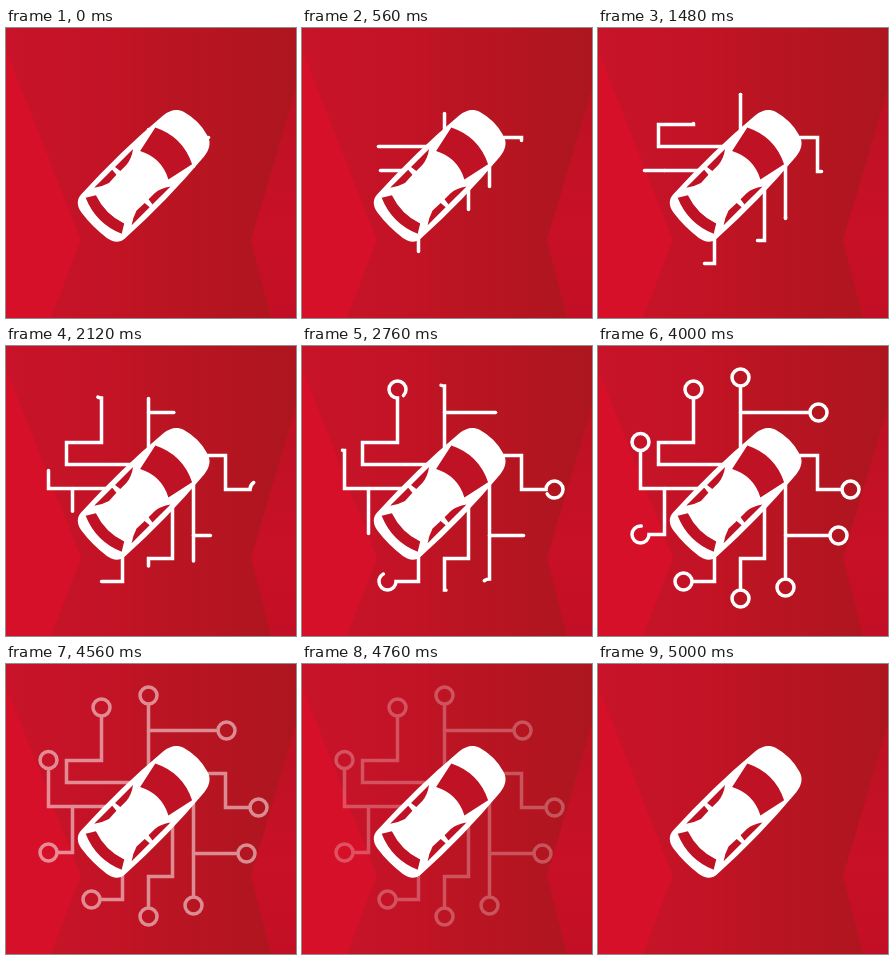
An HTML page for the animation above (5.12 s loop, 290 px wide and 290 px high).

```html
<!DOCTYPE html>
<html lang="en">
<head>
<meta charset="utf-8">
<title>Connected car</title>
<style>
  html, body { margin: 0; width: 100%; height: 100%; overflow: hidden; background: #c01224; }
  svg { display: block; width: 100vw; height: 100vh; }
  #wires { fill: none; stroke: #fff; stroke-width: 3.5; stroke-linecap: round; }
</style>
</head>
<body>
<svg viewBox="0 0 290 290">
  <defs>
    <linearGradient id="back">
      <stop offset="0" stop-color="#c81329"/>
      <stop offset=".4" stop-color="#c21325"/>
      <stop offset=".5" stop-color="#bc1423"/>
      <stop offset="1" stop-color="#ad161e"/>
    </linearGradient>
    <linearGradient id="right" x1="0" y1="0" x2="0" y2="1">
      <stop offset="0" stop-color="#bd1223"/>
      <stop offset=".6" stop-color="#c81026"/>
      <stop offset="1" stop-color="#c30f25"/>
    </linearGradient>
  </defs>
  <path fill="url(#back)" d="M0 0H290V290H0z"/>
  <path fill="#d61029" d="M0 22L75 212L45 290H0z"/>
  <path fill="url(#right)" d="M290 60L245 212L265 290H290z"/>
  <g id="wires" transform="translate(.5 .5)"></g>
  <g transform="translate(138 147.5) rotate(-45)" fill="#bf1224">
    <path fill="#fff" d="M-58 -31Q0 -34 56 -29C65 -28 71 -24 73 -17Q78 0 73 17C71 24 65 28 56 29Q0 34 -58 31C-65 30.500 -69 26 -70.500 18Q-73 0 -70.500 -18C-69 -26 -65 -30.500 -58 -31z"/>
    <path d="M42 -26Q55 0 42 26L14.500 20Q25 0 14.500 -20z"/>
    <path d="M-57 -25.500Q-68 0 -57 25.500L-48 20Q-55 0 -48 -20z"/>
    <path id="windows" d="M11 -26.500Q3 -20.500 -5 -20H-13.500L-14.500 -26.500zM-18.500 -26.500L-19 -20L-30 -19.500Q-38 -22 -44 -26.500z"/>
    <use href="#windows" transform="scale(1 -1)"/>
  </g>
</svg>
<script>
const LOOP = 5120;
const TIMES = [0, 560, 1480, 2240, 2760, 4000, 4300];
const group = document.getElementById('wires');

// Ring of radius 8.5 that starts and ends where the wire meets it
const ring = (dx, dy, sweep = 1) =>
  `a8.5 8.5 0 0 ${sweep} ${dx} ${dy}a8.5 8.5 0 0 ${sweep} ${-dx} ${-dy}`;
const up = ring(0, -17), right = ring(17, 0), left = ring(-17, 0);

// Path, then the length drawn at each of TIMES after the first
const wires = [
  ['M142 101V39.5' + up, 16, 35, 51.5, 65, 115, 115],
  ['M142 66H211.5' + right, 0, 0, 30, 51, 123, 123],
  ['M128 118H60V96H95V51.5' + up, 52, 126, 182, 216, 223, 223],
  ['M101 142H42V104' + up, 23, 55, 81, 99, 151, 151],
  ['M66 142V188H50.5' + left, 0, 0, 27, 45, 102, 115],
  ['M202 109H219V143H243.5' + right, 20, 55, 89, 124, 129, 129],
  ['M187 138V232.5' + ring(0, 17, 0), 20, 52, 81, 100, 148, 148],
  ['M187 189H231.5' + right, 0, 0, 20, 34, 98, 98],
  ['M166 160V212H142V243.5' + ring(0, 17), 21, 59, 88, 109, 161, 161],
  ['M116 207V235H93.5' + left, 16, 38, 51, 86, 104, 104]
].map(([d, ...lengths]) => {
  const path = document.createElementNS('http://www.w3.org/2000/svg', 'path');
  path.setAttribute('d', d);
  group.append(path);
  return { path, lengths: [0, ...lengths] };
});

function lengthAt(lengths, t) {
  const i = TIMES.findIndex(time => time > t);
  if (i < 0) return lengths.at(-1);
  const k = (t - TIMES[i - 1]) / (TIMES[i] - TIMES[i - 1]);
  return lengths[i - 1] + k * (lengths[i] - lengths[i - 1]);
}

function draw() {
  const t = performance.now() % LOOP;
  for (const { path, lengths } of wires) {
    const length = lengthAt(lengths, t);
    path.style.display = length > 0 ? '' : 'none';
    path.style.strokeDasharray = `${length} 999`;
  }
  group.style.opacity = Math.max(0, Math.min(1, (4980 - t) / 820));
  requestAnimationFrame(draw);
}
draw();
</script>
</body>
</html>
```
